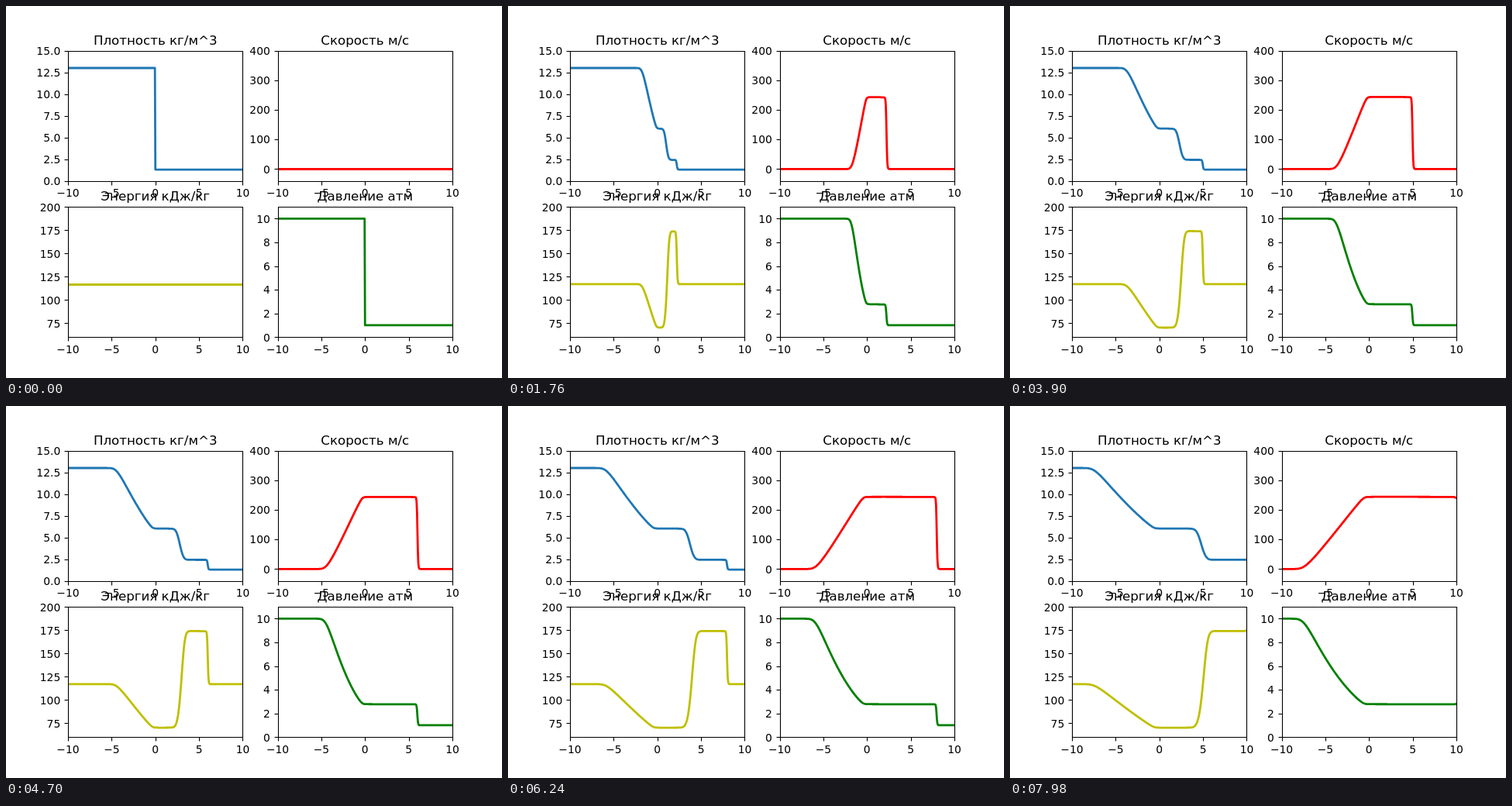
Write an HTML page that moves like this. It is 640 px wide and 480 px high and loops after 8000 ms.

```html
<!DOCTYPE html>
<html lang="ru">
<head>
<meta charset="utf-8">
<title>Распад разрыва</title>
<style>
  html, body { margin: 0; width: 100%; height: 100%; overflow: hidden; background: #fff; }
  svg { display: block; width: 640px; height: 480px; }
  text { font: 13.89px "DejaVu Sans", sans-serif; fill: #000; }
  .title { font-size: 16.67px; text-anchor: middle; }
  .xlabel { text-anchor: middle; }
  .ylabel { text-anchor: end; }
  .curve { fill: none; stroke-width: 2.78; stroke-linejoin: round; stroke-linecap: square; }
  .axis { fill: none; stroke: #000; stroke-width: 1.11; stroke-linecap: square; }
  .tick { fill: none; stroke: #000; stroke-width: 1.11; }
</style>
</head>
<body>
<svg id="stage" viewBox="0 0 640 480"></svg>
<script>
const FRAMES = 400, FRAME_MS = 20;
const W = 225.4545, H = 168;
const LEFT = 80, RIGHT = 350.5455, TOP = 57.6, BOTTOM = 259.2;

// Gas: two states of equal temperature, pressure ratio 10
const G = 5 / 3, ATM = 101325;
const CELLS = 400, STEP = 20 / CELLS, DT = 5e-5;

const panels = [
  { title: "Плотность кг/м^3", x: LEFT, y: TOP, lo: 0, hi: 15, from: 0, by: 2.5, digits: 1,
    color: "#1f77b4", value: (r, m, q) => r },
  { title: "Скорость м/с", x: RIGHT, y: TOP, lo: -40, hi: 400, from: 0, by: 100, digits: 0,
    color: "#ff0000", value: (r, m, q) => m / r },
  { title: "Энергия кДж/кг", x: LEFT, y: BOTTOM, lo: 60, hi: 200, from: 75, by: 25, digits: 0,
    color: "#bfbf00", value: (r, m, q) => q / r / 1000 },
  { title: "Давление атм", x: RIGHT, y: BOTTOM, lo: 0, hi: 11, from: 0, by: 2, digits: 0,
    color: "#008000", value: (r, m, q) => (G - 1) * q / ATM }
];

const stage = document.getElementById("stage");
const snap = v => Math.floor(v + 0.5) + 0.5;

function add(tag, attrs, text) {
  const el = document.createElementNS("http://www.w3.org/2000/svg", tag);
  for (const key in attrs) el.setAttribute(key, attrs[key]);
  if (text !== undefined) el.textContent = text;
  stage.appendChild(el);
  return el;
}

function buildPanel(p, i) {
  const base = p.y + H;
  const clip = add("clipPath", { id: "clip" + i });
  clip.appendChild(add("rect", { x: Math.round(p.x), y: Math.round(p.y), width: 226, height: 169 }));
  p.toY = v => base - (v - p.lo) / (p.hi - p.lo) * H;

  for (let v = -10; v <= 10; v += 5) {
    const x = p.x + (v + 10) / 20 * W;
    add("path", { class: "tick", d: `M${snap(x)} ${snap(base)}v5` });
    add("text", { class: "xlabel", x: x, y: Math.round(base + 20.4) }, String(v).replace("-", "\u2212"));
  }
  for (let v = p.from; v <= p.hi; v += p.by) {
    const y = p.toY(v);
    add("path", { class: "tick", d: `M${snap(p.x)} ${snap(y)}h-5` });
    add("text", { class: "ylabel", x: p.x - 9.72, y: Math.round(y + 5.3) }, v.toFixed(p.digits));
  }
  p.curve = add("path", { class: "curve", stroke: p.color, "clip-path": `url(#clip${i})` });
  const x0 = snap(p.x), y0 = snap(p.y), x1 = snap(p.x + W), y1 = snap(base);
  add("path", { class: "axis", d: `M${x0} ${y0}H${x1}V${y1}H${x0}Z` });
  add("text", { class: "title", x: p.x + W / 2, y: Math.round(p.y - 8) }, p.title);
}

// State: density, momentum and internal energy per volume, three numbers per node
function initialState() {
  const w = new Float64Array(3 * (CELLS + 1));
  for (let i = 0; i <= CELLS; i++) {
    const k = i < CELLS / 2 ? 10 : 1;
    w[3 * i] = 1.3 * k;
    w[3 * i + 2] = k * ATM / (G - 1);
  }
  return w;
}

// One explicit upwind step along the characteristics u+c, u, u-c
function advance(w) {
  const next = w.slice();
  const g = G - 1, ratio = DT / STEP;
  for (let i = 1; i < CELLS; i++) {
    const j = 3 * i;
    const u = w[j + 1] / w[j];
    const c2 = G * g * w[j + 2] / w[j], c = Math.sqrt(c2);
    const flux = (speed, a, b) => {
      const k = speed > 0 ? j : j + 3;
      return speed * (a * (w[k] - w[k - 3]) + b * (w[k + 1] - w[k - 2]) + g * (w[k + 2] - w[k - 1]));
    };
    const s1 = flux(u + c, -u * c, c);
    const s2 = flux(u, -c2, 0);
    const s3 = flux(u - c, u * c, -c);
    const dE = (s1 + s3) / (2 * g);
    const dR = (g * dE - s2) / c2;
    const dM = (s1 - s3) / (2 * c) + u * dR;
    next[j] -= ratio * dR;
    next[j + 1] -= ratio * dM;
    next[j + 2] -= ratio * dE;
  }
  const end = 3 * CELLS;
  for (let k = 0; k < 3; k++) {
    next[k] = next[k + 3];
    next[end + k] = next[end + k - 3];
  }
  return next;
}

function curvePath(p, w) {
  const ys = [];
  for (let j = 0; j < w.length; j += 3) ys.push(p.toY(p.value(w[j], w[j + 1], w[j + 2])));
  // A perfectly level line sits on whole pixels
  const level = ys.every(y => Math.abs(y - ys[0]) < 1e-9);
  return "M" + ys.map((y, i) =>
    (p.x + i / CELLS * W).toFixed(2) + " " + (level ? snap(y) : y).toFixed(3)).join("L");
}

panels.forEach(buildPanel);
const states = [initialState()];
while (states.length < FRAMES) states.push(advance(states[states.length - 1]));

let shown = -1;
function show(frame) {
  if (frame === shown) return;
  shown = frame;
  for (const p of panels) p.curve.setAttribute("d", curvePath(p, states[frame]));
}

const start = performance.now();
function tick() {
  show(Math.floor((performance.now() - start) / FRAME_MS) % FRAMES);
  requestAnimationFrame(tick);
}
show(0);
requestAnimationFrame(tick);
</script>
</body>
</html>
```
